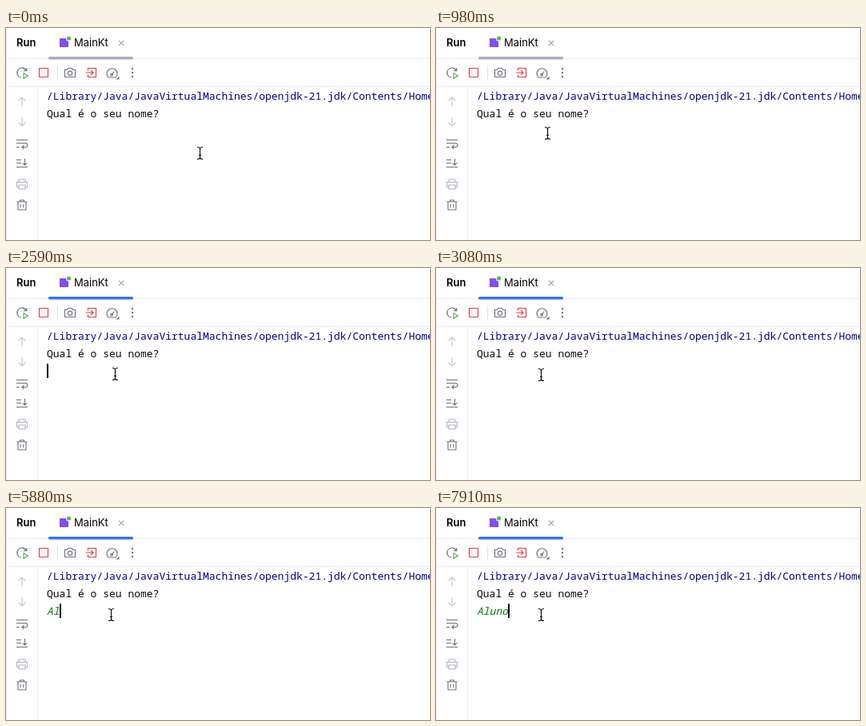
These frames come from a looping animation (530x266 px, 8000 ms). An HTML page with a canvas:

```html
<!DOCTYPE html>
<html lang="pt">
<head>
<meta charset="utf-8">
<title>Run console</title>
<style>
html, body { margin: 0; width: 100%; height: 100%; overflow: hidden; background: #fff; }
canvas { display: block; width: 530px; height: 266px; }
</style>
</head>
<body>
<canvas id="stage"></canvas>
<script>
const W = 530, H = 266, LOOP = 8000, TICK = 70;
const canvas = document.getElementById('stage');
const ctx = canvas.getContext('2d');
const dpr = window.devicePixelRatio || 1;
canvas.width = W * dpr;
canvas.height = H * dpr;

const GREY = '#6c707e', PALE = '#c3c6cf', RED = '#db3b4b', GREEN = '#4fae5a', LINE = '#ebecf0';
const UI = '13px Inter, sans-serif';
const MONO = '13px "Noto Sans Mono", monospace';
const LEFT = 51, CHAR = 7.8;

const FOCUS = 1610;
const BLINKS = [1610, 2100, 2590, 3080, 3710, 4130, 4760, 5110, 5390, 7350, 7910];
const NAME = 'Aluno';
const KEYS = [5390, 5810, 5950, 6160, 6370];
// Pointer stops: time, x, y
const POINTER = [
  [350, 242, 157], [560, 192, 143], [630, 192, 143], [980, 139, 132],
  [1260, 139, 132], [1330, 138, 132], [2520, 138, 132], [2730, 131, 134]
];

const passed = (times, t) => times.filter(k => k <= t).length;

function pointerAt(t) {
  t = Math.floor(t / TICK) * TICK;
  const i = POINTER.findIndex(p => p[0] > t);
  if (i === 0) return POINTER[0].slice(1);
  if (i < 0) return POINTER[POINTER.length - 1].slice(1);
  const a = POINTER[i - 1], b = POINTER[i];
  const k = (t - a[0]) / (b[0] - a[0]);
  return [1, 2].map(n => Math.round(a[n] + (b[n] - a[n]) * k));
}

function text(str, x, y, font, color) {
  ctx.font = font;
  ctx.fillStyle = color;
  ctx.fillText(str, x, y);
}

function rect(x, y, w, h, color) {
  ctx.fillStyle = color;
  ctx.fillRect(x, y, w, h);
}

function pill(x, y, w, h, r, color) {
  ctx.fillStyle = color;
  ctx.beginPath();
  ctx.roundRect(x, y, w, h, r);
  ctx.fill();
}

function dot(x, y, r, color) {
  ctx.fillStyle = color;
  ctx.beginPath();
  ctx.arc(x, y, r, 0, Math.PI * 2);
  ctx.fill();
}

function stroke(d, color, width = 1) {
  ctx.strokeStyle = color;
  ctx.lineWidth = width;
  ctx.stroke(new Path2D(d));
}

// Draws an icon path around its centre
function icon(x, y, d, color = GREY, fill) {
  ctx.save();
  ctx.translate(x, y);
  if (fill) {
    ctx.fillStyle = fill;
    ctx.fill(new Path2D(d));
  }
  stroke(d, color, 1.1);
  ctx.restore();
}

function drawFrame() {
  rect(0, 0, W, H, '#fff');
  rect(0, 0, 1, H, LINE);
  rect(0, 38, W, 1, LINE);
  rect(0, 73, W, 1, LINE);
  rect(39, 73, 1, H - 73, LINE);
  rect(64, 47, 1, 18, '#dfe1e5');
}

function drawTab(focused) {
  text('Run', 13, 23, '600 ' + UI, '#000');
  rect(67, 13, 11, 11, '#834df0');
  dot(78.5, 13, 3.6, '#fff');
  dot(78.5, 13, 2.6, '#55b85c');
  text('MainKt', 85, 23, UI, '#000');
  icon(144, 19, 'M-3.2-3.2L3.2 3.2M3.2-3.2L-3.2 3.2', '#9a9da8');
  pill(53, 36, 106, 3.5, 1.5, focused ? '#3574f0' : '#a8adbd');
}

function drawToolbar() {
  icon(20, 56, 'M5.3-2.5A6 6 0 1 0-1 6M5.8-6V-2.2H2');
  icon(20, 56, 'M2 .8L7.5 4L2 7.2Z', GREEN, '#f2fcf3');
  icon(47, 56, 'M-5-5.5H5Q5.5-5.5 5.5-5V5Q5.5 5.5 5 5.5H-5Q-5.5 5.5-5.5 5V-5Q-5.5-5.5-5-5.5Z', RED, '#fff7f7');
  icon(80, 56, 'M-6.5-3.5H-3.5L-2.3-5.5H2.3L3.5-3.5H6.5V5.5H-6.5ZM2.7 .8A2.7 2.7 0 1 1-2.7 .8A2.7 2.7 0 1 1 2.7 .8');
  icon(107, 56, 'M-4.5-2.5V-5.5H5.5V5.5H-4.5V2.5M-7 0H2M-1-3L2 0L-1 3', RED);
  icon(132.5, 57, 'M-4.5 5H4.5A6.5 6.5 0 1 0-4.5 5ZM-.5 1.5L3-2.5M1 1.5A1.4 1.4 0 1 1-1.8 1.5A1.4 1.4 0 1 1 1 1.5');
  ctx.fillStyle = GREY;
  ctx.fill(new Path2D('M141.5 60.5V64.5H137.5Z'));
  for (const y of [51, 56, 61]) dot(158, y, 1.2, GREY);
}

function drawSidebar() {
  icon(20, 92, 'M0 5.5V-5M-4.5-.5L0-5L4.5-.5', PALE);
  icon(20, 118, 'M0-5.5V5M-4.5 .5L0 5L4.5 .5', PALE);
  icon(20, 145, 'M-7-4.5H7M-7-.5H4.5A2.5 2.5 0 0 1 4.5 4.5H0M2.5 2L0 4.5L2.5 7M-7 4.5H-3');
  icon(20, 170, 'M-7-4.5H-1M-7-.5H-1M-7 4.5H7M3.5-6V2M.8-.7L3.5 2L6.2-.7');
  icon(20, 196, 'M-4-2.5V-6H4V-2.5M-4 3.5H-6.5V-2.5H6.5V3.5H4M-4 1H4V6H-4Z', '#b0b3bd');
  icon(20, 222, 'M-6.5-4H6.5M-2.5-4V-6H2.5V-4M-5-4V6H5V-4M-1.8-1V3.5M1.8-1V3.5');
}

function drawConsole(t) {
  text('/Library/Java/JavaVirtualMachines/openjdk-21.jdk/Contents/Home/bin/java', LEFT, 90, MONO, '#00007f');
  text('Qual é o seu nome?', LEFT, 112, MONO, '#080808');
  const typed = passed(KEYS, t);
  text(NAME.slice(0, typed), LEFT, 134, 'italic ' + MONO, '#007f00');
  if (passed(BLINKS, t) % 2) rect(Math.round(LEFT + typed * CHAR), 120, 2, 18, '#000');
}

function drawPointer(t) {
  const [x, y] = pointerAt(t);
  const beam = 'M-3.5-7.5Q0-7.5 0-5.5Q0-7.5 3.5-7.5M0-5.5V5.5M-3.5 7.5Q0 7.5 0 5.5Q0 7.5 3.5 7.5M-1.5 2.5H1.5';
  ctx.save();
  ctx.translate(x + .5, y);
  stroke(beam, '#fff', 3);
  stroke(beam, '#111', 1.2);
  ctx.restore();
}

function draw(now) {
  const t = now % LOOP;
  ctx.setTransform(dpr, 0, 0, dpr, 0, 0);
  drawFrame();
  drawTab(t >= FOCUS);
  drawToolbar();
  drawSidebar();
  drawConsole(t);
  drawPointer(t);
}

const start = performance.now();
function loop() {
  draw(performance.now() - start);
  requestAnimationFrame(loop);
}
loop();
</script>
</body>
</html>
```
